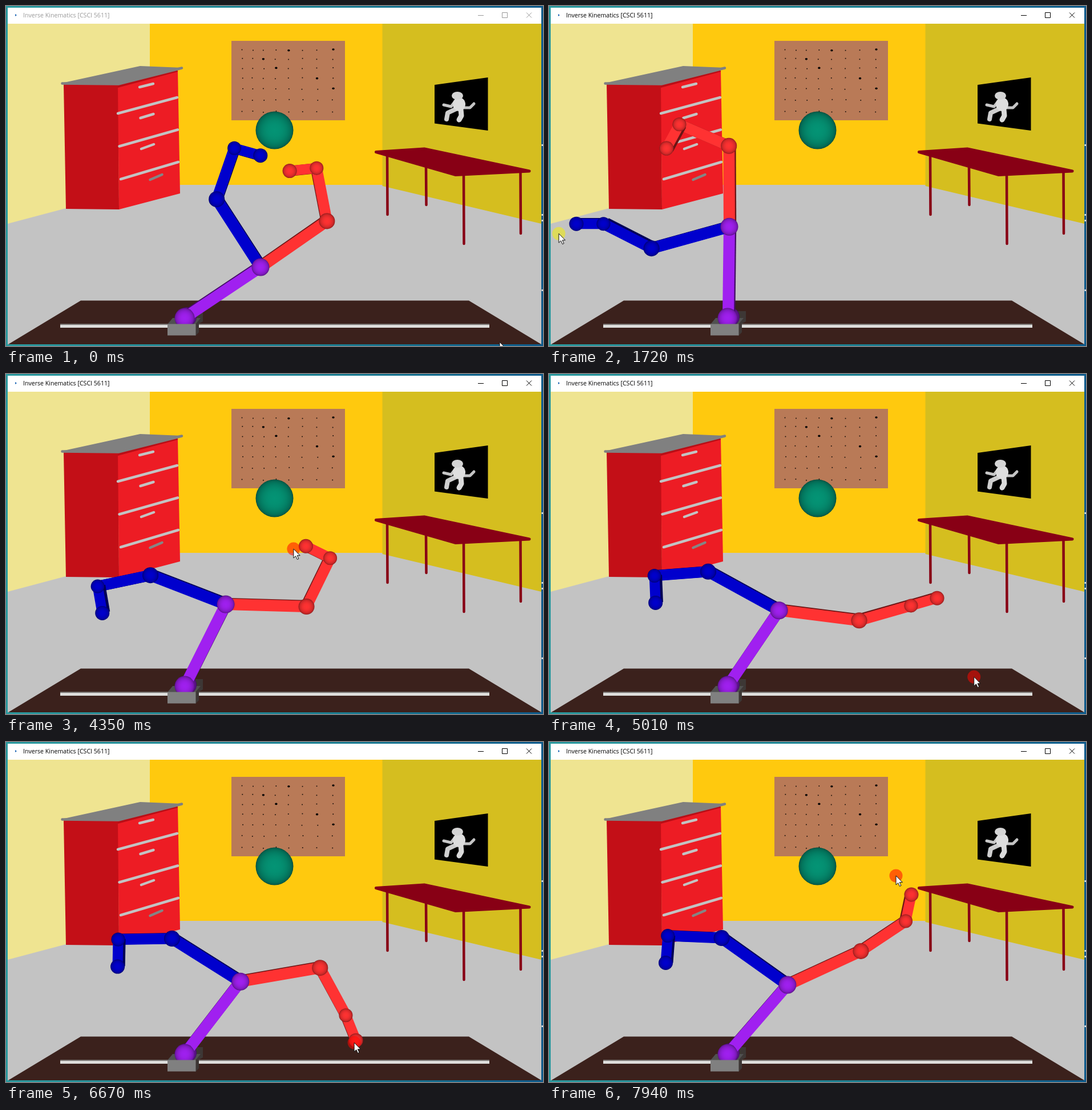
Recreate the animation shown at these times as an HTML page with a canvas. Size 941 px wide and 595 px high, loop 7990 ms.

```html
<!DOCTYPE html>
<html lang="en">
<head>
<meta charset="utf-8">
<title>Inverse Kinematics</title>
<style>
html, body { margin: 0; width: 100%; height: 100%; overflow: hidden; background: #1b7f92; }
canvas { display: block; width: 941px; height: 595px; }
</style>
</head>
<body>
<canvas id="stage" width="941" height="595"></canvas>
<script>
const ctx = document.getElementById('stage').getContext('2d');
const LOOP = 7990;
const BASE = { x: 314, y: 545 };
const VANISH = { x: 470, y: 311 };

// Key points: time, then values. Each joint angle is relative to its parent,
// so an arm that is not being dragged simply rides on the root link.
const rootKeys = [
  [700, -33.7], [1720, -89.3], [2930, -85.7], [3600, -84],
  [4350, -63.4], [5670, -48.3], [6670, -52.4], [7940, -49.1]
];
const blueKeys = [
  [700, -89.2, 52, 86.6], [1720, -106.2, 42.6, -27],
  [2930, -110.8, -34.4, -68], [3600, -95.5, -33, -88]
];
const redKeys = [
  [3600, -1, -66.3, -85], [4350, 65, -65.6, -90], [5670, 61, 19.3, 89.4],
  [6670, 42.6, 71.3, 6.7], [7940, 24.4, -9, -44.3]
];
const pointerKeys = [
  [70, 865, 588], [930, 617, 450], [1500, -3, 352], [1720, 17, 398],
  [2500, 125, 595], [2930, 129, 604], [3420, 122, 570], [4350, 503, 306],
  [4700, 815, 330], [5010, 745, 530], [5670, 564, 564], [6200, 600, 600],
  [6670, 610, 526], [7250, 680, 598], [7700, 715, 400], [7940, 608, 234]
];

const BLUE = [0, 0, 205], RED = [255, 50, 50], PURPLE = [160, 32, 240], GREEN = [4, 148, 117];

function sample(keys, t) {
  let i = 0;
  while (i < keys.length - 2 && keys[i + 1][0] <= t) i++;
  const a = keys[i], b = keys[i + 1];
  const k = Math.max(0, Math.min(1, (t - a[0]) / (b[0] - a[0])));
  return a.slice(1).map((v, j) => v + (b[j + 1] - v) * k);
}

function seeded(seed) {
  return () => (seed = seed * 16807 % 2147483647) / 2147483647;
}

const shade = (rgb, light) => `rgb(${rgb.map(v => Math.round(v * light))})`;

function trace(p) {
  ctx.beginPath();
  for (let i = 0; i < p.length; i += 2) ctx.lineTo(p[i], p[i + 1]);
}

function poly(color, ...p) {
  trace(p);
  ctx.fillStyle = color;
  ctx.fill();
}

function line(color, width, cap, ...p) {
  trace(p);
  ctx.strokeStyle = color;
  ctx.lineWidth = width;
  ctx.lineCap = cap;
  ctx.lineJoin = 'round';
  ctx.stroke();
}

function rect(color, x, y, w, h) {
  ctx.fillStyle = color;
  ctx.fillRect(x, y, w, h);
}

function oval(color, x, y, rx, ry = rx) {
  ctx.beginPath();
  ctx.ellipse(x, y, rx, ry, 0, 0, 7);
  ctx.fillStyle = color;
  ctx.fill();
}

// Half ambient light, half light from the viewer.
function ball(rgb, x, y, r) {
  const g = ctx.createRadialGradient(x, y, 0, x, y, r);
  for (let k = 0; k <= 10; k++) {
    const d = Math.sqrt(k / 10);
    g.addColorStop(d, shade(rgb, 0.5 + 0.5 * Math.sqrt(1 - d * d)));
  }
  oval(g, x, y, r);
}

// The unlit side of a link shows towards the vanishing point.
function link(rgb, a, b, width) {
  const dx = (VANISH.x - (a.x + b.x) / 2) * 0.015;
  const dy = (VANISH.y - (a.y + b.y) / 2) * 0.015;
  line(shade(rgb, 0.42), width, 'butt', a.x + dx, a.y + dy, b.x + dx, b.y + dy);
  line(shade(rgb, 1), width, 'butt', a.x, a.y, b.x, b.y);
}

function reach(p, deg, len) {
  const a = deg * Math.PI / 180;
  return { x: p.x + Math.cos(a) * len, y: p.y + Math.sin(a) * len };
}

function arm(rgb, hub, heading, bends) {
  const lengths = [141.5, 94.5, 47.5], radii = [14, 12, 12.5];
  const joints = [hub];
  bends.forEach((bend, i) => joints.push(reach(joints[i], heading += bend, lengths[i])));
  for (let i = 0; i < 3; i++) link(rgb, joints[i], joints[i + 1], 20 - i);
  for (let i = 0; i < 3; i++) ball(rgb, joints[i + 1].x, joints[i + 1].y, radii[i]);
}

function frame(active) {
  const g = ctx.createLinearGradient(0, 0, 941, 0);
  g.addColorStop(0, '#2a9a9f');
  g.addColorStop(0.6, '#1b7f92');
  g.addColorStop(1, '#0d5a8c');
  rect(g, 0, 0, 941, 595);
  for (const y of [242, 364, 374, 496]) rect('#d8e4ea', 938.5, y, 2.5, 3);
  rect('#fff', 3, 3, 935, 28);
  const ink = active ? '#000' : '#999';
  poly('#1a64b4', 16, 14, 19, 16, 16, 18);
  ctx.fillStyle = ink;
  ctx.font = '10.6px "Open Sans", "Noto Sans", sans-serif';
  ctx.fillText('Inverse Kinematics [CSCI 5611]', 30, 20);
  rect(ink, 827, 16, 10, 1);
  ctx.strokeStyle = ink;
  ctx.lineWidth = 1;
  ctx.strokeRect(869.5, 11.5, 9, 9);
  line(ink, 1, 'butt', 912, 11.5, 921, 20.5);
  line(ink, 1, 'butt', 921, 11.5, 912, 20.5);
}

function room() {
  rect('#c3c3c3', 3, 31, 935, 561);
  poly('#efe491', 3, 31, 252, 31, 252, 315, 3, 381);
  rect('#ffc90e', 252, 31, 408, 282);
  poly('#d5be1f', 659.5, 31, 938, 31, 938, 381, 659.5, 315);
}

function board() {
  rect('#b97a57', 395, 61, 199, 139);
  const big = ['40', '70', '21', '32', '63', '74'];
  const random = seeded(17);
  for (let r = 0; r < 7; r++) {
    for (let c = 0; c < 8; c++) {
      const x = 414 + 17 * c + 0.8 * c * c + random() * 2 - 0.5;
      const y = 77 + 15 * r + 0.5 * r * r + random() * 2 - 1;
      if (big.includes(`${c}${r}`)) oval('#000', x, y, 2.2, 1.8);
      else oval('#1c120c', x, y, 1);
    }
  }
}

function cabinet() {
  poly('#c30f17', 101, 137, 197, 137, 198, 356, 105, 355);
  poly('#ed1c24', 196, 137, 301, 113, 305, 328, 198, 356);
  poly('#b90e16', 196, 137, 300, 110, 301, 115, 196, 143);
  poly('#808080', 97, 135, 235, 105, 309, 108, 197, 138);
  line('#808080', 4.5, 'round', 98.5, 135.5, 197, 136.5, 308, 108.5);
  for (let i = 0; i < 3; i++) {
    line('#c3c3c3', 4.5, 'round', 196 + 2.5 * i, 188 + 57.5 * i, 300 + i, 160 + 56.5 * i);
  }
  for (let i = 0; i < 4; i++) {
    const x = 234 + 1.5 * i + (i === 3 ? 14 : 0), y = 142 + 54 * i;
    line(i < 3 ? '#c3c3c3' : '#858585', 4.5, 'round', x, y, x + 24 - i, y - 6 - i);
  }
}

function picture() {
  poly('#000', 751, 138, 844.5, 125, 844.5, 218, 751, 205.5);
  const limb = (color, width, ...p) => line(color, width, 'round', ...p);
  limb('#c4c4c4', 5, 803, 178, 813, 178, 820, 171);
  limb('#c8c8c8', 5, 786, 168, 780, 176, 767, 173);
  limb('#cfcfcf', 8, 789, 180, 774, 187, 772, 198);
  limb('#dadada', 9, 797, 181, 798, 192, 794, 199);
  oval('#dedede', 794, 172, 11, 12);
  oval('#d4d4d4', 791, 157, 10, 7);
}

function table() {
  const color = '#880015';
  for (const [x, y, end] of [[668, 262, 365], [736, 282, 348], [802, 296, 416], [901.5, 292, 398]]) {
    line(color, 4.5, 'round', x, y, x + 0.5, end);
  }
  const top = [648.5, 255.5, 733, 250, 917, 289, 788, 295.5, 648.5, 255.5];
  poly(color, ...top);
  line(color, 5, 'round', ...top);
}

function rail() {
  poly('#3b211c', 131, 515.5, 811, 515.5, 938, 592, 4, 592);
  rect('#777270', 95, 556, 752, 2);
  rect('#dededc', 95, 558, 752, 5);
}

function robot(t) {
  const [root] = sample(rootKeys, t);
  const hub = reach(BASE, root, 158.7);
  poly('#3d3735', 283, 557, 307, 534, 345, 534, 345, 552, 338, 556, 338, 571, 332, 577);
  poly('#505050', 283, 557, 292, 546, 341, 546, 332, 557);
  ball(PURPLE.map(v => v * 0.75), 317, 544, 17);
  link(PURPLE, BASE, hub, 20);
  arm(BLUE, hub, root, sample(blueKeys, t));
  arm(RED, hub, root, sample(redKeys, t));
  ball(PURPLE, hub.x, hub.y, 15.5);
  ball(PURPLE, 313, 546, 17.5);
  rect('#808080', 283, 556.5, 49.5, 20);
}

function cursor(t) {
  const [x, y] = sample(pointerKeys, t);
  const pressed = t >= 930 && t < 1650 || t >= 2500;
  if (t >= 70) oval(pressed ? 'rgba(255,6,0,.54)' : 'rgba(240,235,20,.6)', x, y, 11.5);
  ctx.save();
  ctx.translate(x, y);
  const arrow = [0, 0, 0, 16, 3.7, 12.5, 6.5, 18.5, 9, 17.3, 6.3, 11.6, 11.3, 11.6, 0, 0];
  poly('#fff', ...arrow);
  line('#111', 1, 'butt', ...arrow);
  ctx.restore();
}

function draw(t) {
  frame(t >= 70);
  ctx.save();
  ctx.beginPath();
  ctx.rect(3, 31, 935, 561);
  ctx.clip();
  room();
  board();
  cabinet();
  picture();
  table();
  rail();
  ball(GREEN, 470.5, 217.5, 33);
  robot(t);
  ctx.restore();
  cursor(t);
}

const start = performance.now();
function tick() {
  draw((performance.now() - start) % LOOP);
  requestAnimationFrame(tick);
}
tick();
</script>
</body>
</html>
```
